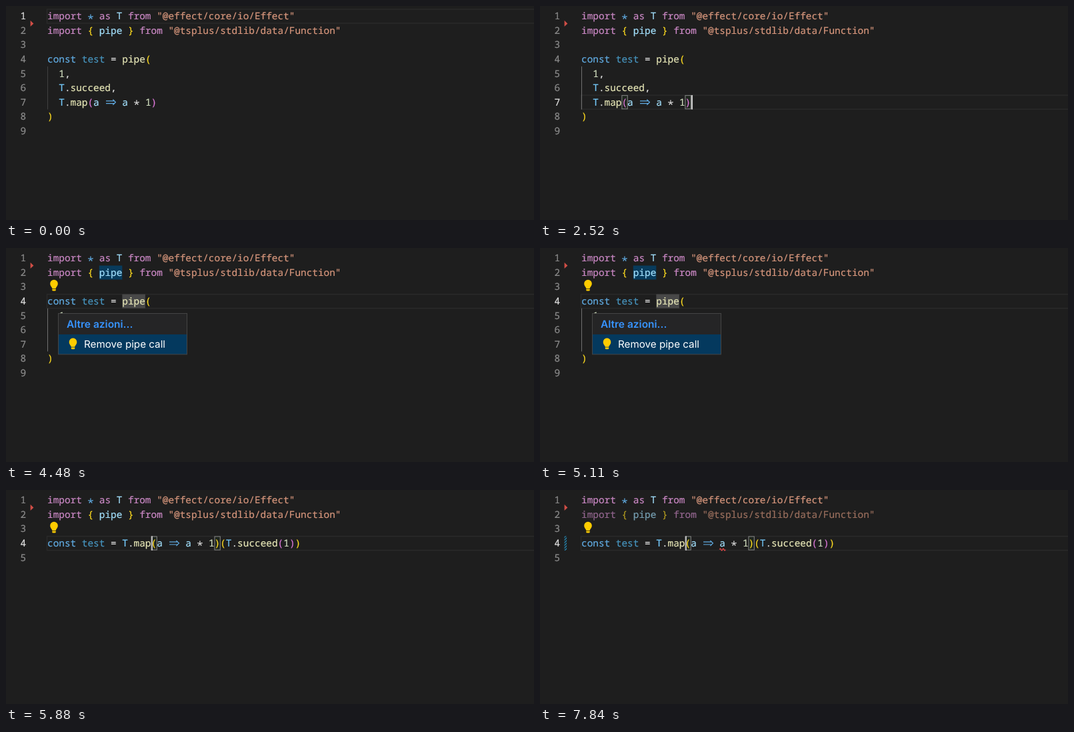
These frames come from a looping animation (792x322 px, 7.91 s). An HTML page:

```html
<!DOCTYPE html>
<html lang="en">
<head>
<meta charset="utf-8">
<title>Remove pipe call</title>
<style>
  html, body { margin: 0; width: 100%; height: 100%; overflow: hidden; background: #1e1e1e; }
  svg { display: block; width: 792px; height: 322px; }
  text { white-space: pre; text-rendering: geometricPrecision; }
  .code, .star { font: 500 14.4px "Noto Sans Mono", "DejaVu Sans Mono", monospace; stroke-width: .2px; }
  .star { font-size: 18px; text-anchor: middle; }
  .menu { font: 15.2px Inter, "Open Sans", sans-serif; }
</style>
</head>
<body>
<svg id="stage" viewBox="0 0 792 322"></svg>
<script>
const LOOP = 7910, LEFT = 62, CHAR = 8.64, ROW = 21.56;
const CLICK_MAP = 1190, CLICK_PIPE = 2870, MENU = 4480, MENU_CLOSED = 5740, EDIT = 5880, CHECKED = 6510;

const COLORS = {
  k: '#cc89c6', b: '#62aee6', v: '#a4e2ff', n: '#74c8f8', u: '#4795bf', f: '#e8e8b8',
  s: '#d8977d', d: '#d4e2c2', w: '#e0e0e0', y: '#ffdc20', p: '#de78da'
};

const stage = document.getElementById('stage');
const layers = [];
const colX = col => LEFT + col * CHAR;
const rowTop = row => 4.7 + (row - 1) * ROW;
const baseline = row => 20.3 + (row - 1) * ROW;

const rect = (x, y, w, h, attrs) => `<rect x="${x}" y="${y}" width="${w}" height="${h}" ${attrs}/>`;
const text = (x, y, fill, body, attrs = `class="code" stroke="${fill}"`) =>
  `<text x="${x}" y="${y}" fill="${fill}" ${attrs}>${body}</text>`;

// Each span is a [from, to) interval in which the layer is shown.
function layer(markup, ...spans) {
  const node = document.createElementNS('http://www.w3.org/2000/svg', 'g');
  node.innerHTML = markup;
  stage.append(node);
  if (spans.length) layers.push({ node, spans });
  return node;
}

function arrow(x, y) {
  return `<path d="M${x + 1.6} ${y - 1.9}h12.4M${x + 1.6} ${y + 1.9}h12.4M${x + 12} ${y - 4}l4 4l-4 4"
    fill="none" stroke="${COLORS.b}" stroke-width="1.2"/>`;
}

// Source is a list of color|token pairs; tokens keep their spaces.
function code(row, source, col = 0) {
  const parts = source.split('|');
  let out = '';
  for (let i = 0; i < parts.length; i += 2) {
    const token = parts[i + 1], fill = COLORS[parts[i]], x = colX(col), y = baseline(row);
    if (token === '=> ') out += arrow(x, y - 4.9);
    else if (token === '* ') out += text(x + CHAR / 2, y + 5.3, fill, '*', 'class="star"');
    else out += text(x, y, fill, token);
    col += token.length;
  }
  return out;
}

const lineBox = row =>
  rect(LEFT - .5, rowTop(row) + .3, 740, ROW - .6, 'fill="none" stroke="#292929" stroke-width="1.6"');
const wordBox = (row, col, fill) => rect(colX(col), rowTop(row) + .2, CHAR * 4, ROW - .5, `fill="${fill}"`);
const bracketBox = (row, col) =>
  rect(colX(col) + .4, rowTop(row) + .6, CHAR - .3, ROW - 1.4, 'fill="#1e251e" stroke="#888" stroke-width="1"');
const cursor = (row, col, width) => rect(colX(col) + .6, rowTop(row), width, ROW, 'fill="#c8c8c8"');
const guide = color => rect(LEFT, rowTop(5), 1, ROW * 3, `fill="${color}"`);
const bulb = (x, y) => `<g fill="#ffcc00" transform="translate(${x} ${y})">
  <path d="M-2.7 5.2C-2.7 3.2-5.8 1.8-5.8-2.2A5.8 5.8 0 0 1 5.8-2.2C5.8 1.8 2.7 3.2 2.7 5.2Z"/>
  <path d="M-2.7 6H2.7V7.6Q2.7 8.6 1.5 8.6H-1.5Q-2.7 8.6-2.7 7.6Z"/></g>`;

// Backgrounds
layer(rect(0, 0, 792, 322, 'fill="#1e1e1e"'));
layer(lineBox(1), [0, CLICK_MAP]);
layer(lineBox(7), [CLICK_MAP, CLICK_PIPE]);
layer(lineBox(4), [CLICK_PIPE, LOOP]);
layer(guide('#404040'), [0, CLICK_MAP]);
layer(guide('#707070'), [CLICK_MAP, EDIT]);
layer(wordBox(2, 9, '#083b5c') + wordBox(4, 13, '#484848'), [3150, EDIT]);
layer(bracketBox(7, 7) + bracketBox(7, 18), [1260, CLICK_PIPE]);
layer(bracketBox(4, 18) + bracketBox(4, 29), [EDIT, LOOP]);

// Gutter
const numbers = Array.from({ length: 9 }, (_, i) =>
  layer(text(21.5, baseline(i + 1), 'currentColor', i + 1), [0, i < 5 ? LOOP : EDIT]));
layer('<path d="M36.6 21.8L41.4 26.4L36.6 31Z" fill="#d04e46"/>');
layer(`<defs><pattern id="stripes" width="4" height="4" patternUnits="userSpaceOnUse">
  <path d="M-1 1L1-1M0 4L4 0M3 5L5 3" stroke="#2489b5" stroke-width="1.3"/></pattern></defs>` +
  rect(36.5, rowTop(4), 3.6, ROW, 'fill="url(#stripes)"'), [CHECKED, LOOP]);

// Code
layer(code(1, 'k|import |b|* |k|as |v|T |k|from |s|"@effect/core/io/Effect"'));
const pipeImport = layer(code(2, 'k|import |y|{ |v|pipe |y|} |k|from |s|"@tsplus/stdlib/data/Function"'));
layer(code(4, 'b|const |u|test |w|= '));
layer(
  code(4, 'f|pipe|y|(', 13) +
  code(5, 'd|1|w|,', 2) +
  code(6, 'n|T|w|.|f|succeed|w|,', 2) +
  code(7, 'n|T|w|.|f|map|p|(|v|a |b|=> |v|a |w|* |d|1|p|)', 2) +
  code(8, 'y|)'), [0, EDIT]);
layer(code(4, 'n|T|w|.|f|map|y|(|v|a |b|=> |v|a |w|* |d|1|y|)(|n|T|w|.|f|succeed|p|(|d|1|p|)|y|)', 13), [EDIT, LOOP]);
layer(`<path d="M${colX(24)} 89.6q1.1-3 2.2 0t2.2 0t2.2 0t2.2 0" fill="none" stroke="#f14c4c" stroke-width="1.3"/>`,
  [CHECKED, LOOP]);

// Cursors, with their blinking
layer(cursor(7, 19, 2.3), [CLICK_MAP, 1820], [2310, 2800]);
layer(cursor(4, 16, 1.8), [CLICK_PIPE, 3430], [3920, MENU]);
layer(cursor(4, 18, 1.8), [EDIT, 6300], [6790, 7350], [7840, LOOP]);

// Quick fix
layer(bulb(72, 55.8), [3780, LOOP]);
layer(
  rect(78, 98, 193.5, 62, 'fill="#252526"') +
  rect(78, 130, 193.5, 30, 'fill="#04395e"') +
  rect(78.5, 98.5, 193, 61.5, 'fill="none" stroke="#454545"') +
  text(91, 120, '#3794ff', 'Altre azioni...', 'class="menu" style="font-size:15.5px;font-weight:600"') +
  bulb(100.5, 143.6) +
  text(117, 150.2, '#fff', 'Remove pipe call', 'class="menu"'), [MENU, MENU_CLOSED]);

const start = performance.now();

function paint() {
  const t = (performance.now() - start) % LOOP;
  for (const { node, spans } of layers)
    node.style.display = spans.some(([from, to]) => t >= from && t < to) ? '' : 'none';
  const active = t < CLICK_MAP ? 1 : t < CLICK_PIPE ? 7 : 4;
  numbers.forEach((node, i) => node.style.color = i + 1 === active ? '#e0e0e0' : '#8c8c8c');
  pipeImport.style.opacity = t >= CHECKED ? .667 : 1;
  requestAnimationFrame(paint);
}
paint();
</script>
</body>
</html>
```
